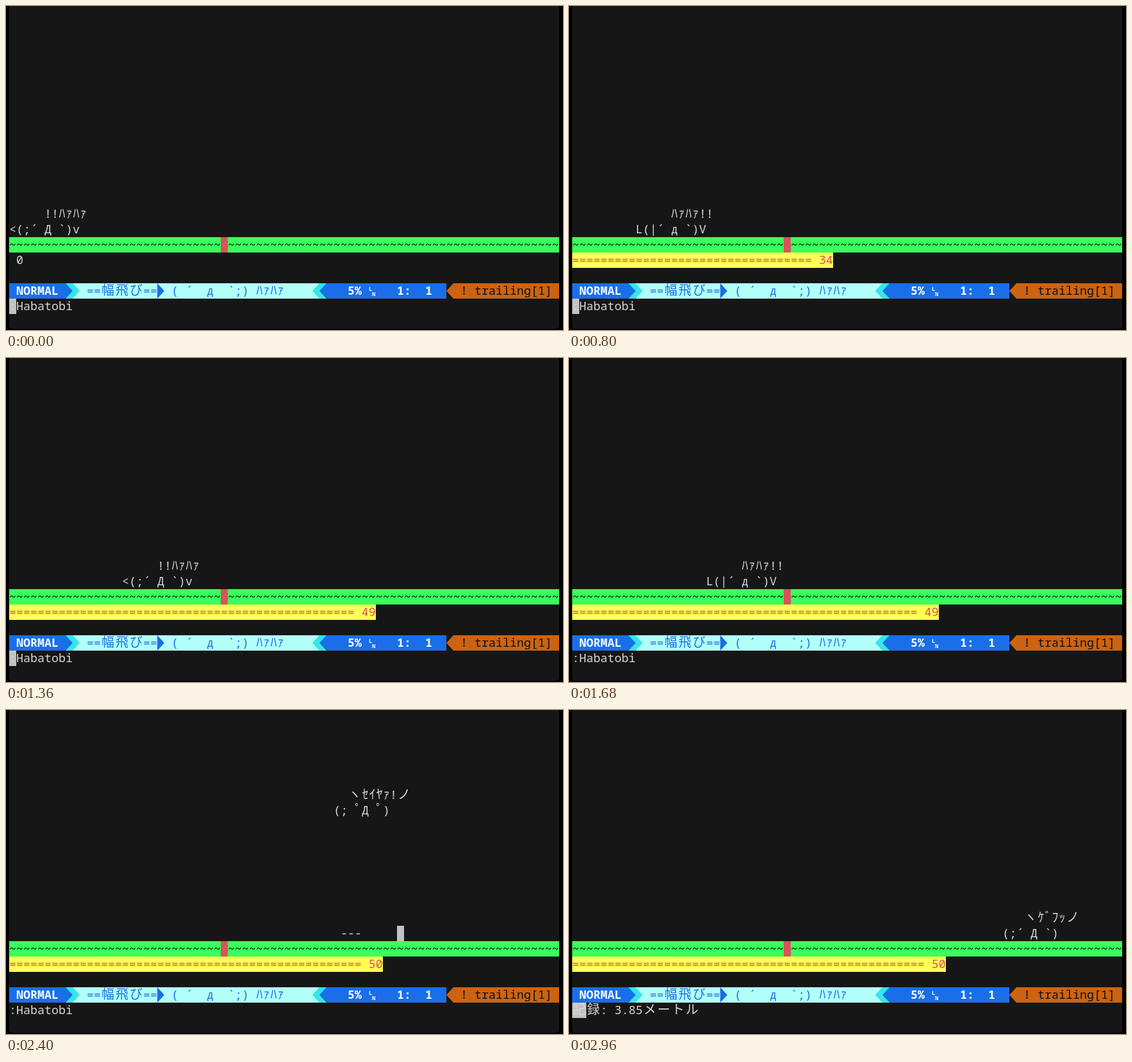
Recreate the animation shown at these times as an HTML page. Size 869x506 px, loop 3.04 s.

```html
<!DOCTYPE html>
<html lang="ja">
<head>
<meta charset="utf-8">
<title>Habatobi</title>
<style>
  html, body { margin: 0; width: 100%; height: 100%; overflow: hidden; background: #000; }
  #term {
    position: absolute; left: 5px; top: 0; width: 858px; height: 504px;
    background: #161616; border-radius: 0 0 5px 5px;
    color: #dad7d4;
    font: 500 18.333px/24px "Noto Sans Mono", "DejaVu Sans Mono", monospace;
    font-variant-ligatures: none;
  }
  .box, .text { position: absolute; height: 24px; }
  .text { white-space: pre; margin-top: -1px; }
  .text i {
    display: inline-block; width: 11px; line-height: 0; text-align: center;
    font: normal 500 20px/0 "Noto Sans CJK JP", "Noto Sans CJK", sans-serif;
  }
  .text i.wide { width: 22px; }
  .bold { font-weight: 700; color: #f2f8ff; }
  .title { color: #1b70e6; }
  .ink { color: #101010; }
  .red { color: #d9525a; }
  .tiny { font-size: 9px; line-height: 9px; height: 9px; }
  .right { clip-path: polygon(0 0, 100% 50%, 0 100%); }
  .left { clip-path: polygon(100% 0, 0 50%, 100% 100%); }
</style>
</head>
<body>
<div id="term"><div id="fixed"></div><div id="live"></div></div>
<script>
const CELL = 11, LINE = 24, STEP = 80, STEPS = 38;
const GROUND = 337, TRACK = 361, GAUGE = 385, STATUS = 433, COMMAND = 457;
const BLUE = '#1a6fe8', CYAN = '#35e6ea', PALE = '#b4fffa', ORANGE = '#cd6312';
const GREEN = '#3bff5d', RED = '#d9525a', YELLOW = '#ffff55', CURSOR = '#c5c1c3';

// Japanese characters take one or two whole terminal cells.
const cells = s => s
  .replace(/&/g, '&amp;').replace(/</g, '&lt;')
  .replace(/[\u3000-\u9fff]/g, c => `<i class="wide">${c}</i>`)
  .replace(/[\uff61-\uff9f]/g, c => `<i>${c}</i>`);

const text = (col, y, s, cls = '') =>
  `<div class="text ${cls}" style="left:${col * CELL}px;top:${y}px">${cells(s)}</div>`;

const box = (col, y, cols, color, cls = '') =>
  `<div class="box ${cls}" style="left:${col * CELL}px;top:${y}px;` +
  `width:${cols * CELL}px;background:${color}"></div>`;

function fixedParts() {
  return box(0, TRACK, 78, GREEN) + text(0, TRACK, '~'.repeat(78), 'ink') +
    box(30, TRACK, 1, RED) +
    box(0, STATUS, 62, BLUE) +
    box(8, STATUS, 37, CYAN) + box(9, STATUS, 35, PALE) +
    box(8, STATUS, 1, BLUE, 'right') + box(9, STATUS, 1, CYAN, 'right') +
    box(21, STATUS, 1, BLUE, 'right') +
    box(43, STATUS, 1, CYAN, 'left') + box(44, STATUS, 1, BLUE, 'left') +
    box(62, STATUS, 1, ORANGE, 'left') + box(63, STATUS, 15, ORANGE) +
    text(1, STATUS, 'NORMAL', 'bold') +
    text(11, STATUS, '==幅飛び==', 'title') +
    text(23, STATUS, '( ´  д  `;) ﾊｧﾊｧ', 'title') +
    text(48, STATUS, '5%', 'bold') +
    text(51, STATUS + 5, 'L', 'bold tiny') + text(51.45, STATUS + 13, 'N', 'bold tiny') +
    text(55, STATUS, '1:  1', 'bold') +
    text(64, STATUS, '! trailing[1]', 'ink');
}

// Linear interpolation through [step, value] pairs.
function along(points, n) {
  const k = Math.max(1, points.findIndex(p => p[0] >= n));
  const [a, u] = points[k - 1], [b, v] = points[k];
  return u + (v - u) * (n - a) / (b - a);
}

const strideAt = n => Math.round(along([[0, 0], [6, 4], [14, 13], [21, 19], [22, 20]], n));

function powerAt(n) {
  if (n <= 14) return Math.round(along([[0, 0], [6, 17], [14, 50]], n));
  return n < 22 && n % 2 ? 49 : 50;
}

function gauge(power) {
  const bar = '='.repeat(power) + ' ' + power;
  return power
    ? box(0, GAUGE, bar.length, YELLOW) + text(0, GAUGE, bar, 'red')
    : text(0, GAUGE, bar);
}

const figure = (col, y, body, shout, shift) =>
  text(col, y, body) + text(col + shift, y - LINE, shout);

function run(n) {
  const col = strideAt(n);
  return col % 2
    ? figure(col, GROUND, 'L(|´ д `)V', 'ﾊｧﾊｧ!!', 5)
    : figure(col, GROUND, '<(;´ Д `)v', '!!ﾊｧﾊｧ', 5);
}

function jump(n) {
  const col = Math.min(61, Math.round(46 + 3.4 * (n - 30)));
  const height = Math.max(0, Math.floor(9 - 0.213 * (n - 28.5) ** 2));
  return box(col + 9, GROUND, 1, CURSOR) +
    (height ? text(col + 1, GROUND, '---') : '') +
    figure(col, GROUND - height * LINE, '(; ﾟД ﾟ)', 'ヽｾｲﾔｧ!ノ', 2);
}

function prompt(n) {
  if (n >= 36) return box(0, COMMAND, 2, CURSOR) + text(0, COMMAND, '記録: 3.85メートル');
  return (n < 21 ? box(0, COMMAND, 1, CURSOR) : '') + text(0, COMMAND, ':Habatobi');
}

function scene(n) {
  const runner = n < 23 ? run(n)
    : n < 36 ? jump(n)
    : figure(61, GROUND, '(;´ Д `)', 'ヽｹﾞﾌｯノ', 3);
  return runner + gauge(powerAt(n)) + prompt(n);
}

const live = document.getElementById('live');
document.getElementById('fixed').innerHTML = fixedParts();
const start = performance.now();
let shown = -1;

function tick() {
  const n = Math.floor((performance.now() - start) / STEP) % STEPS;
  if (n !== shown) live.innerHTML = scene(shown = n);
  requestAnimationFrame(tick);
}
tick();
</script>
</body>
</html>
```
